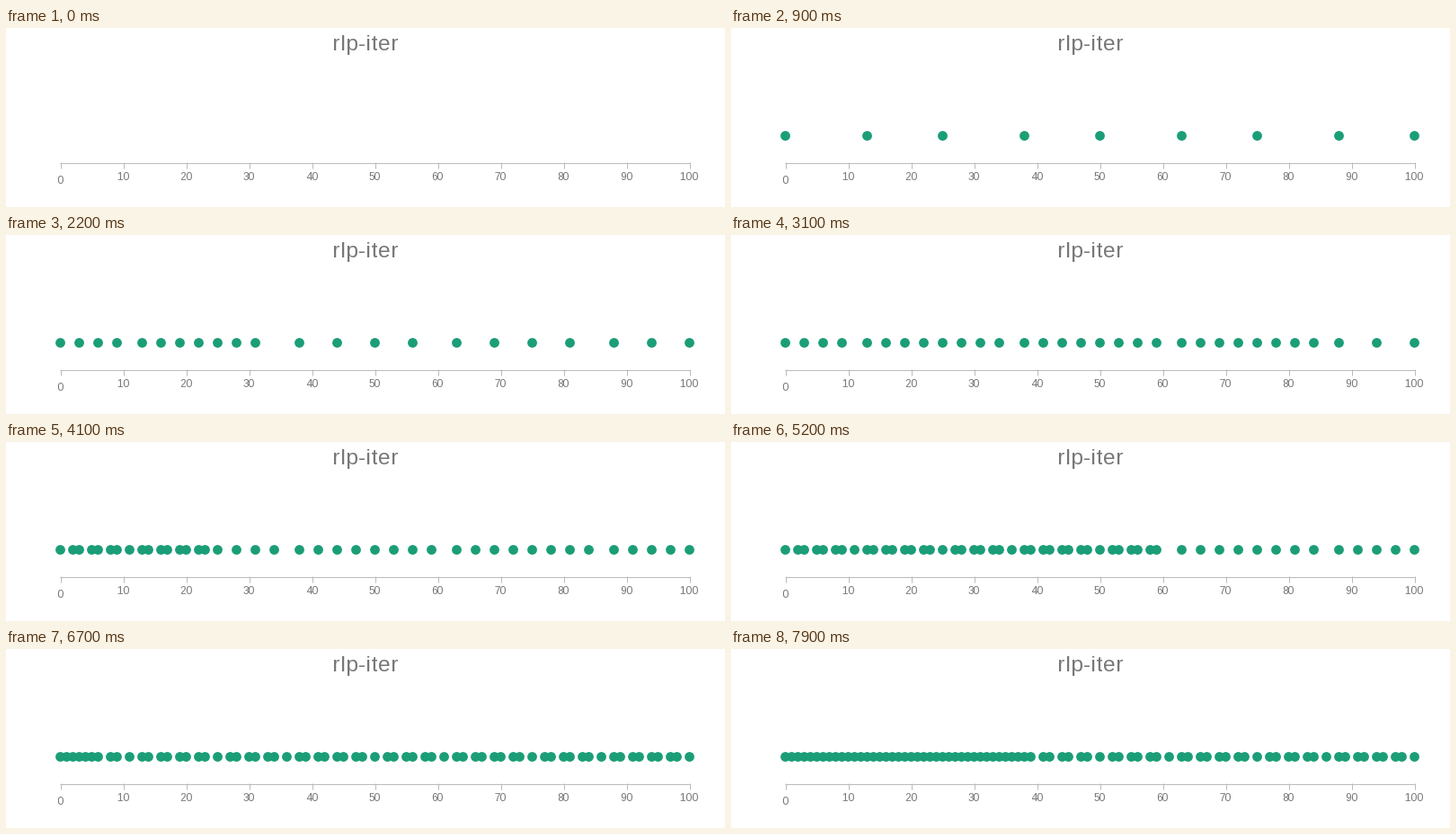
A matplotlib script for the animation above (8 s loop, 800 by 200 pixels).

```python
import math

import matplotlib.pyplot as plt
from matplotlib.animation import FuncAnimation
from matplotlib.patches import Circle

W, H, DPI = 800, 200, 100
FRAMES, INTERVAL = 80, 100
LEFT, SCALE = 60, 7
DOT, TEXT, LINE = "#1b9e77", "#777777", "#bbbbbb"

plt.rcParams.update({
    "font.family": "Liberation Sans",
    "text.hinting": "force_autohint",
    "text.hinting_factor": 1,
})


def pt(px):
    return px * 72 / DPI


def xpos(value):
    return LEFT + SCALE * value


def bisect_order(count):
    """Integers of 0..100: the ends, then ever finer midpoints, no repeats."""
    order = [0, 100]
    parts = 2
    while len(order) < count:
        for k in range(1, parts, 2):
            value = math.floor(100 * k / parts + 0.5)
            if value not in order:
                order.append(value)
        parts *= 2
    return order[:count]


fig = plt.figure(figsize=(W / DPI, H / DPI), dpi=DPI, facecolor="white")
ax = fig.add_axes([0, 0, 1, 1])
ax.set_xlim(0, W)
ax.set_ylim(H, 0)
ax.axis("off")


def line(x0, y0, x1, y1):
    ax.plot([x0, x1], [y0, y1], color=LINE, lw=pt(1), solid_capstyle="butt")


def label(x, y, text, px):
    ax.text(x, y, text, fontsize=pt(px), color=TEXT, ha="center", va="baseline")


label(400, 25, "rlp-iter", 24)
line(LEFT, 150.5, xpos(100) + 1, 150.5)
for tick in range(0, 101, 10):
    x = xpos(tick)
    line(x + 0.5, 150, x + 0.5, 157)
    if tick:
        label(x, 170, str(tick), 12)
    else:
        label(x - 0.5, 174, "0", 12)

dots = [
    ax.add_patch(Circle((xpos(v) + 0.5, 120.5), 5.4, fc=DOT, ec="none", zorder=3))
    for v in bisect_order(FRAMES - 1)
]


def draw(frame):
    for i, dot in enumerate(dots):
        dot.set_visible(i < frame)
    return dots


anim = FuncAnimation(fig, draw, frames=FRAMES, interval=INTERVAL,
                     init_func=lambda: draw(0), repeat=True, blit=False)
plt.show()
```
